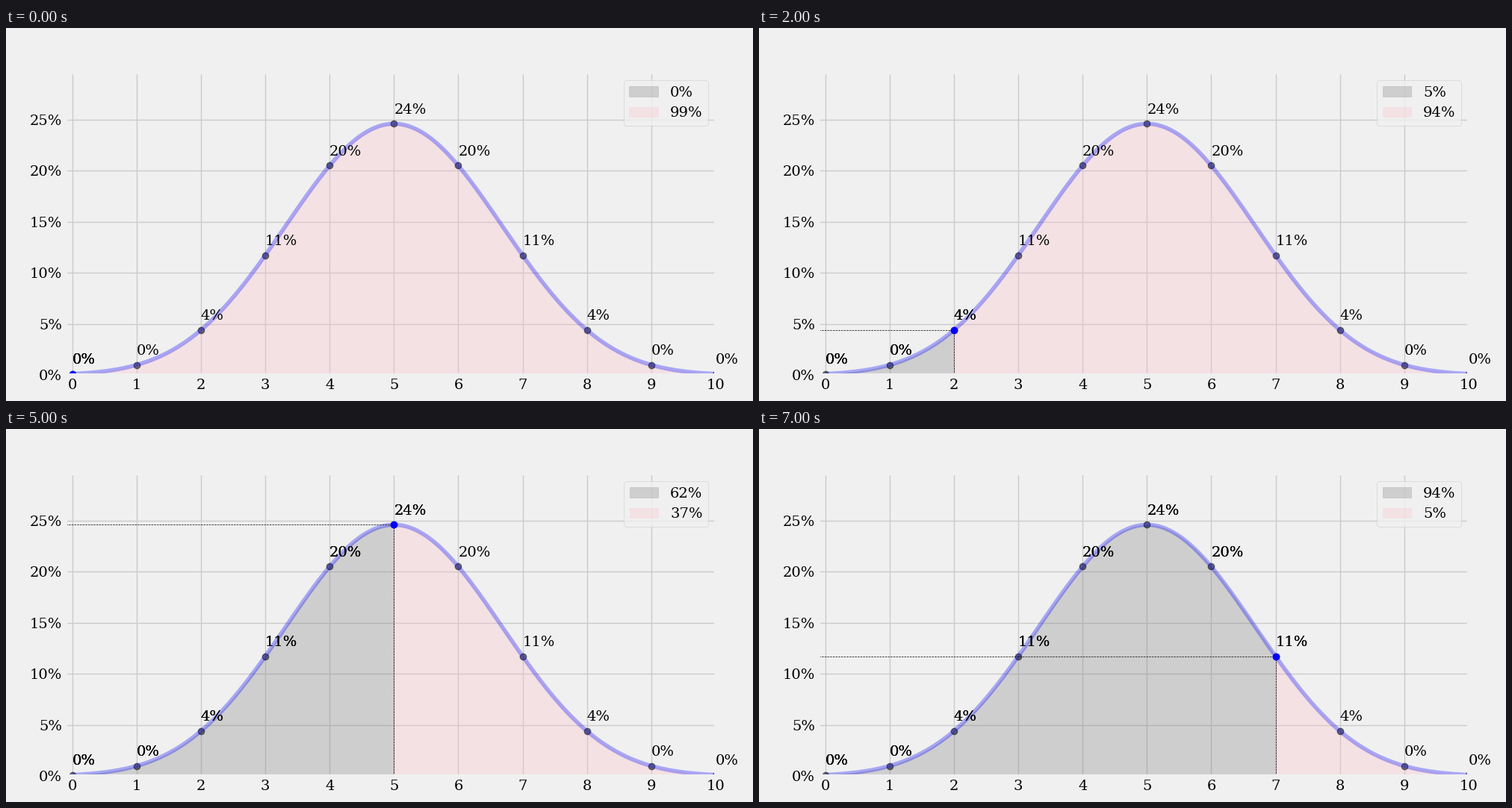
A matplotlib script that plays this animation: 1000x500 px, repeating every 8 s.

```python
import math

import matplotlib.pyplot as plt
import numpy as np
from matplotlib.animation import FuncAnimation

TRIALS = 10
STEPS = 8

plt.style.use("fivethirtyeight")
plt.rcParams["font.family"] = "DejaVu Serif"


def pmf(x):
    """Fair-coin binomial probability, extended to real x."""
    ways = math.gamma(TRIALS + 1) / (math.gamma(x + 1) * math.gamma(TRIALS - x + 1))
    return ways / 2**TRIALS


def percent(p):
    return f"{int(p * 100)}%"


counts = np.arange(TRIALS + 1)
probs = np.array([pmf(k) for k in counts])
xs = np.linspace(0, TRIALS, 1001)
ys = np.array([pmf(x) for x in xs])

fig, ax = plt.subplots(figsize=(10, 5), dpi=100)
ax.set_xlim(-0.1, TRIALS)
ax.set_ylim(0, probs.max() + 0.05)
ax.set_xticks(counts)
levels = np.arange(0, 30, 5)
ax.set_yticks(levels / 100, [f"{v}%" for v in levels])


def add_label(k):
    return ax.text(k, probs[k] + 0.01, percent(probs[k]), fontsize=14, color="black")


ax.plot(counts, probs, "ko", alpha=0.5)
ax.plot(xs, ys, color="blue", alpha=0.3)
for k in counts:
    add_label(k)

# Visited labels are printed again on top, which makes them look heavier.
add_label(0)
visited = [add_label(k) for k in range(STEPS)]

(drop,) = ax.plot([], [], "k--", linewidth=0.5)
(level,) = ax.plot([], [], "k--", linewidth=0.5)
(dot,) = ax.plot([], [], "bo")
fills = []


def shade(mask, color, share):
    fills.append(ax.fill_between(xs[mask], ys[mask], color=color, alpha=0.3,
                                 label=percent(share)))


def update(k):
    while fills:
        fills.pop().remove()
    below = probs[:k + 1].sum()
    shade(xs <= k, "gray", below)
    shade(xs >= k, "pink", 1 - below)
    ax.legend(handles=list(fills), loc="upper right", fontsize=14)

    drop.set_data([k, k], [0, probs[k]])
    level.set_data([-0.1, k], [probs[k], probs[k]])
    dot.set_data([k], [probs[k]])
    for i, label in enumerate(visited):
        label.set_visible(i <= k)
    return []


anim = FuncAnimation(fig, update, frames=STEPS, interval=1000, repeat=True,
                     repeat_delay=0, blit=False)
plt.show()
```
